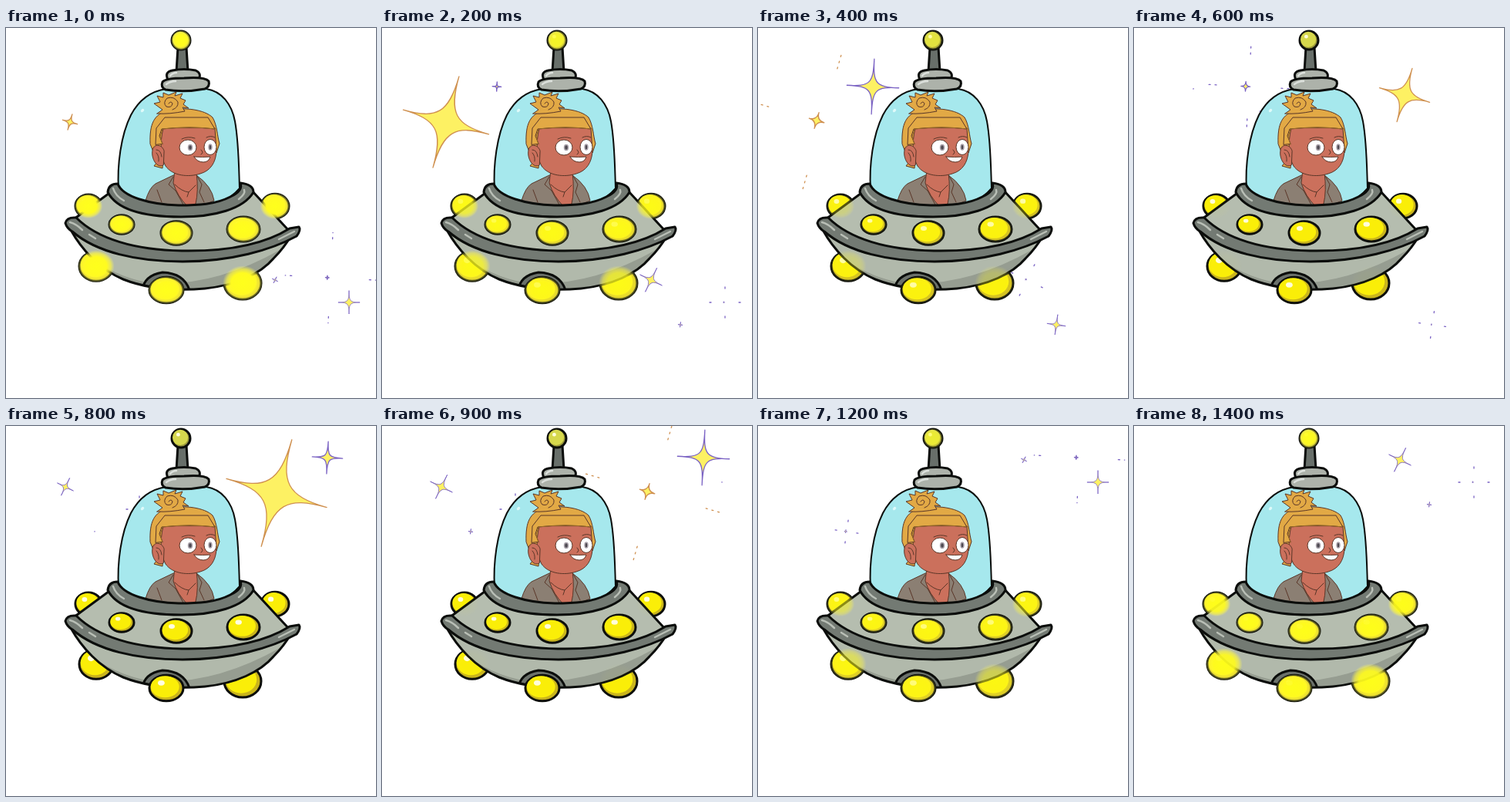
Animation, 480 px wide and 480 px high, one loop 1.5 s. Source, as an HTML page:

```html
<!DOCTYPE html>
<html lang="en">
<head>
<meta charset="utf-8">
<title>Flying saucer</title>
<style>
  html, body { margin: 0; width: 100%; height: 100%; overflow: hidden; background: #fff; }
  svg { display: block; width: 100vmin; height: 100vmin; }
  path { stroke-linejoin: round; stroke-linecap: round; }
  .ink { stroke: #0b0d0b; stroke-width: 3; }
  .fine { stroke: #5a3628; stroke-width: 1; }
  .line { fill: none; }
  .shine { fill: none; stroke: #b9bfb6; stroke-width: 2.5; }
</style>
</head>
<body>
<svg viewBox="0 0 480 480">
  <defs>
    <radialGradient id="halo">
      <stop offset="0" stop-color="#ffff1c"/>
      <stop offset=".58" stop-color="#fffb20"/>
      <stop offset=".8" stop-color="#fff83c" stop-opacity=".7"/>
      <stop offset="1" stop-color="#fffa60" stop-opacity="0"/>
    </radialGradient>
    <path id="hull" d="M84 262C98 287 121 313 152 326C185 339 222 341 258 338C298 334 330 319 347 299Q361 285 370 269L230 290Z"/>
    <clipPath id="hullClip"><use href="#hull"/></clipPath>
  </defs>

  <g id="stars"></g>
  <g id="backLamps"></g>

  <!-- dome -->
  <path class="ink" fill="#a6e8ed" style="stroke-width:2"
    d="M146 210C144 178 149 139 162 113C172 94 187 82 208 79H260C280 82 293 99 297 121C302 148 302 180 303 208Q280 236 224 234Q165 232 146 210Z"/>
  <ellipse cx="177" cy="107" rx="2.5" ry="1.8" fill="#dffafa" transform="rotate(-45 177 107)"/>

  <!-- pilot -->
  <g>
    <path class="fine" fill="#8b7f73" d="M181 224Q186 207 194 202L217 191H247Q267 205 270 224L250 232H195Z"/>
    <path class="fine" fill="#cb705c" d="M219 184L217 201Q222 218 236 232L246 228Q250 212 247 187Z"/>
    <path class="fine line" d="M217 193L211 203L220 211L231 231M248 192L254 203L251 213L257 226M196 210L202 226M219 203Q228 212 237 213L246 204M237 213L235 219"/>
    <path class="fine" fill="#e2a945" d="M187 150C186 124 192 112 210 107C231 102 258 106 268 116C274 126 274 140 277 150L273 162L262 140H206L203 182L192 179L196 174Z"/>
    <path class="fine" fill="#cb705c" d="M204 130C199 150 201 168 207 179C216 192 237 194 252 189C266 185 272 174 273 160L271 130Z"/>
    <path class="fine" fill="#e2a945" d="M203 150L199 140L202 131Q239 127 271 131L262 116H206L195 130L194 151Z" stroke="none"/>
    <path class="line" stroke="#9a6a28" d="M203 151L200 141L203 131Q239 127 271 131"/>
    <path class="fine" fill="#cb705c" d="M205 159C202 150 191 150 190 159C188 169 196 183 204 178Z"/>
    <path class="fine line" d="M195 158Q201 158 202 167M195 162Q199 166 198 173"/>
    <path class="fine" fill="#e2a945" d="M196 111L203 106L192 98L200 96L196 88L204 90L204 84L211 87L221 83L219 88L229 85L226 91L233 94L230 99L237 104L229 103L232 108Q212 112 196 111Z"/>
    <path class="fine line" d="M211 98Q214 94 216 98Q215 104 208 102Q203 97 209 91Q218 88 223 96Q224 103 216 106"/>
    <g class="fine" fill="#fff">
      <ellipse cx="236" cy="155" rx="11" ry="10"/>
      <ellipse cx="265" cy="154.500" rx="8" ry="10"/>
      <path d="M244 167Q255 168 265 167Q263 174 256 174Q248 174 244 167Z"/>
    </g>
    <g fill="#4c4850" stroke="#aaa3ab" stroke-width="1.5">
      <ellipse cx="239" cy="155" rx="2.500" ry="3.500"/>
      <ellipse cx="265" cy="154.500" rx="2" ry="3.500"/>
    </g>
    <path class="fine line" d="M228 144Q236 140 245 143M260 142Q266 139 271 142M253 158Q257 162 253 164"/>
  </g>

  <!-- antenna -->
  <path class="ink" fill="#686f6a" d="M223 25H234L236 57H221Z"/>
  <path class="ink" fill="#adb2aa" d="M210 67Q205 57 216 55Q231 52 246 55Q255 59 249 68Z"/>
  <path class="ink" fill="#adb2aa" d="M207 80Q200 77 203 70Q207 65 231 65Q258 63 263 69Q265 76 258 79Q231 84 207 80Z"/>
  <path class="shine" style="stroke:#dce0dc" d="M213 62Q216 58 221 58M208 73Q213 69 220 69"/>

  <!-- hull -->
  <use href="#hull" fill="#b1b9ab"/>
  <g clip-path="url(#hullClip)">
    <path fill="#969d91" d="M100 290Q140 324 190 331Q270 336 355 288V345H130Z"/>
    <path class="ink" fill="#6b716b" d="M177 340Q179 321 203 317Q231 318 238 340Z"/>
  </g>
  <use href="#hull" class="ink" fill="none"/>
  <path class="ink" fill="#b5bdaf" d="M137 212L88 248Q122 286 220 294Q318 293 368 264L319 211Q281 245 226 244Q166 244 137 212Z"/>
  <path class="ink" fill="#737a73" d="M91 246Q79 245 77 253Q79 260 86 264C117 291 170 303 229 303C292 303 344 288 377 270Q383 262 380 258L368 260C333 282 284 290 228 289C168 288 119 274 91 246Z"/>
  <path class="shine" d="M83 252Q91 254 99 262M108 268L116 273M354 274L374 264"/>

  <!-- collar -->
  <path class="ink" fill="#737a73" d="M145 202Q133 202 132 213C145 238 186 245 227 245C270 245 308 235 321 213Q321 203 304 201Q308 211 291 219C272 229 249 230 224 230C187 229 151 219 145 202Z"/>
  <path class="shine" d="M139 208Q142 218 153 224M309 210Q311 215 302 222"/>

  <g id="frontLamps"></g>
  <g id="halos"></g>
</svg>
<script>
const STEP = 100, STEPS = 15;
const NS = "http://www.w3.org/2000/svg";
const byId = id => document.getElementById(id);

function add(parent, tag, attrs) {
  const el = document.createElementNS(NS, tag);
  for (const k in attrs) el.setAttribute(k, attrs[k]);
  parent.append(el);
  return el;
}

function lamp(group, x, y, rx, ry, fill = "#faee08", shade = "#c9b41c") {
  const oval = (cx, cy, k, color, cls = "") =>
    add(byId(group), "ellipse", { cx, cy, rx: rx * k, ry: ry * k, fill: color, class: cls });
  oval(x, y, 1, shade, "ink");
  oval(x - rx * .08, y - ry * .1, .84, fill);
  oval(x - rx * .3, y - ry * .4, .2, "#fffde0");
  add(byId("halos"), "ellipse", { cx: x, cy: y, rx: rx * 1.08, ry: ry * 1.08, fill: "url(#halo)" });
}

// x, y, radius
for (const [x, y, r] of [[107, 231, 17], [349, 231, 18], [117, 309, 22], [307, 331, 24]])
  lamp("backLamps", x, y, r, r * .88);
for (const [x, y, r] of [[150, 255, 16], [221, 266, 20], [308, 261, 21], [208, 340, 22]])
  lamp("frontLamps", x, y, r, r * .76);
lamp("frontLamps", 227, 16, 12, 12, "#d5d74e", "#98963b");

// One burst: five stars that peak two steps apart.
const burst = [
  { dx: 0, dy: 0, r: 72, tilt: 16 },
  { dx: 66, dy: -46, r: 42, tilt: 3 },
  { dx: 90, dy: -14, r: 15, tilt: 0 },
  { dx: -6, dy: -43, r: 17, tilt: 26 },
  { dx: 32, dy: 15, r: 13, tilt: 8 }
];
const origins = [
  { x: 83, y: 122, peak: 3 },
  { x: 351, y: 87, peak: 8 },
  { x: 355, y: 370, peak: -4 }
];

const stars = origins.flatMap(o => burst.map(({ dx, dy, r, tilt }, i) => {
  const g = add(byId("stars"), "g", {});
  const stroke = r > 50 ? "#cf9050" : "#7a62c4";
  return {
    x: o.x + dx, y: o.y + dy, r, tilt, g,
    peak: o.peak + 2 * i,
    body: add(g, "path", { fill: "#fdf163", stroke, "stroke-width": r > 30 ? 1.3 : .8 }),
    tips: add(g, "path", { fill: "none", stroke, "stroke-width": 1.3, "stroke-dasharray": "2 6" })
  };
}));

function starPath(r, waist) {
  const w = r * .94, c = r * waist;
  return `M0 ${-r}C0 ${-c} ${c} 0 ${w} 0C${c} 0 0 ${c} 0 ${r}C0 ${c} ${-c} 0 ${-w} 0C${-c} 0 0 ${-c} 0 ${-r}Z`;
}

function tipPath(a, b) {
  return `M0 ${-a}V${-b}M0 ${a}V${b}M${-a} 0H${-b}M${a} 0H${b}`;
}

// Swell to the peak, then collapse to a core while the tips fly off.
function drawStar(s, step) {
  const u = step - s.peak;
  const alive = u > -4 && u < 3, broken = u > 0;
  s.g.style.display = alive ? "" : "none";
  if (!alive) return;
  const swell = (.5 + .5 * Math.cos(u * Math.PI / 4)) ** (s.r < 20 ? 2 : 1);
  const size = s.r * (broken ? .24 - .09 * u : swell);
  const drift = broken ? -.1 * s.r : 0;
  s.g.setAttribute("transform", `translate(${s.x} ${s.y}) rotate(${s.tilt})`);
  s.body.setAttribute("transform", `translate(${drift} 0)`);
  s.body.setAttribute("d", starPath(size, broken ? .35 : s.r > 50 ? .2 : .1));
  s.tips.setAttribute("d", broken ? tipPath(s.r * (.8 + .2 * u), s.r * (1.2 + .1 * u)) : "");
}

const start = performance.now();
let shown = -1;
function tick() {
  const step = Math.floor((performance.now() - start) / STEP) % STEPS;
  if (step !== shown) {
    shown = step;
    const glow = .5 + .5 * Math.cos(2 * Math.PI * step / STEPS);
    byId("halos").setAttribute("opacity", glow ** 1.5);
    stars.forEach(s => drawStar(s, step));
  }
  requestAnimationFrame(tick);
}
tick();
</script>
</body>
</html>
```
